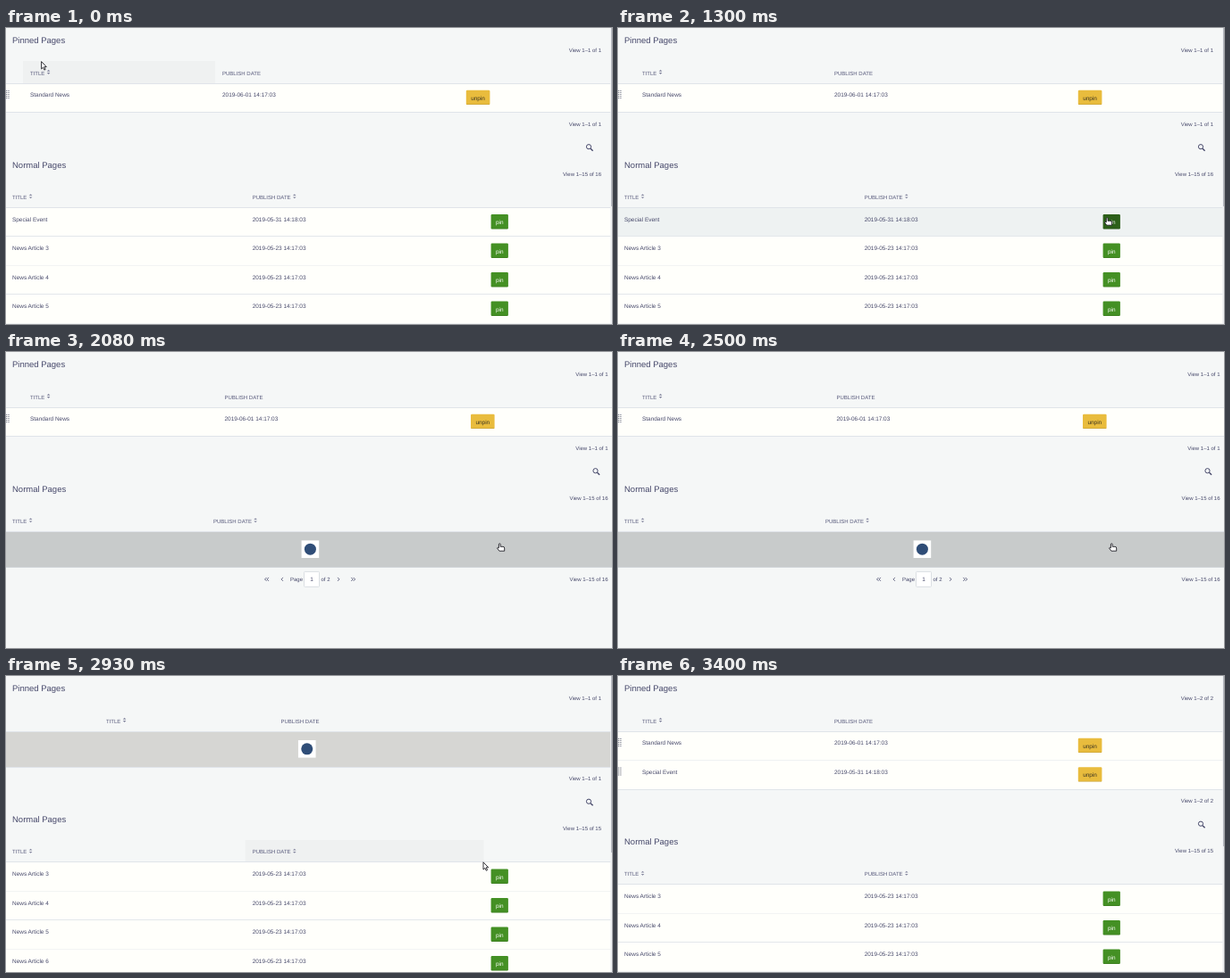
Write an HTML page that moves like this. It is 678x332 px and loops after 3.87 s.

```html
<!DOCTYPE html>
<html lang="en">
<head>
<meta charset="utf-8">
<title>Pinned pages</title>
<style>
  html, body { margin: 0; width: 100%; height: 100%; overflow: hidden; background: #f5f7f7; }
  svg { display: block; width: 678px; height: 332px; }
  text {
    font-family: "Liberation Sans", Arial, sans-serif; font-size: 6.45px;
    fill: #47496b; text-rendering: geometricPrecision;
  }
  .title { font-size: 9.5px; }
  .small { font-size: 6px; }
  .head { fill: #56587a; }
  .end { text-anchor: end; }
  .mid { text-anchor: middle; }
  .light { fill: #fff; }
  .dark { fill: #3a3322; }
  .icon { fill: none; stroke: #47496b; stroke-width: .8; }
</style>
</head>
<body>
<svg viewBox="0 0 678 332"><g id="page"></g><g id="cursor"></g></svg>
<script>
const LOOP = 3870, ROW = 32.5, EMPTY = 40, TOP = 62, HEAD = 25, GAP = 106.9;
const CREAM = '#fffffb', HOVER = '#eef2f2', LINE = '#e0e4e9';
const BTN_Y = 7.7, BTN_H = 16.4, PIN_X = 542.6, PIN_W = 19.3, UNPIN_W = 26.6;
const STANDARD = ['Standard News', '2019-06-01 14:17:03'];
const SPECIAL = ['Special Event', '2019-05-31 14:18:03'];
const ARTICLES = [3, 4, 5, 6].map(n => ['News Article ' + n, '2019-05-23 14:17:03']);

const page = document.getElementById('page');
const pointer = document.getElementById('cursor');

// Cursor runs: start, end, number of steps, way points (first = resting place)
const RUNS = [
  [100, 100, 1, [[39.6, 37.6], [40, 38.3]]],
  [350, 800, 8, [[40, 38.3], [110, 66], [240, 122], [345, 163], [380.3, 175]]],
  [930, 1430, 11, [[380.3, 175], [400, 177], [465, 190], [530, 209], [557, 215], [551.3, 213.8]]],
  [1850, 1850, 1, [[551.3, 213.8], [552.3, 214.8]]],
  [2830, 2930, 4, [[552.3, 214.8], [548, 213], [534, 208.8]]],
  [2955, 3100, 6, [[534, 208.8], [420, 165], [250, 98], [163, 61.5]]],
  [3180, 3330, 3, [[163, 61.5], [135, 47], [64, 8.5]]]
];
const GONE = 3400;

function along(points, p) {
  const s = p * (points.length - 1), i = Math.min(Math.floor(s), points.length - 2), f = s - i;
  return [0, 1].map(k => points[i][k] + (points[i + 1][k] - points[i][k]) * f);
}

function tipAt(t) {
  if (t >= GONE) return [-50, -50];
  let tip = RUNS[0][3][0];
  for (const [from, to, n, points] of RUNS) {
    if (t < from) break;
    const gap = n > 1 ? (to - from) / (n - 1) : 1;
    const step = Math.min(n, Math.floor((t - from) / gap + 1e-6) + 1);
    tip = along(points, step / n);
  }
  return tip;
}

function stateAt(t) {
  const moved = t >= 2510, done = t >= 3060;
  return {
    pinned: done ? [STANDARD, SPECIAL] : t >= 2550 ? [] : [STANDARD],
    normal: moved ? ARTICLES : t >= 2030 ? [] : [SPECIAL, ...ARTICLES],
    total: moved ? 15 : 16,
    pins: done ? 2 : 1,
    veil: moved ? t >= 2630 : t >= 2050,
    thumb: done ? 191 : t >= 2550 ? 198 : 200
  };
}

const rect = (x, y, w, h, fill, more = '') =>
  `<rect x="${x}" y="${y}" width="${w}" height="${h}" fill="${fill}" ${more}/>`;
// y is the middle of the line
const text = (x, y, str, cls = '', drop = 2.3) =>
  `<text x="${x}" y="${y + drop}" class="${cls}">${str}</text>`;
const path = (d, cls) => `<path d="${d}" class="${cls}"/>`;
const rule = (y, w) => rect(0, Math.floor(y), w, 1, LINE);
const sorter = (x, y) =>
  `<path d="M${x - 1.8} ${y - .8}l1.8-1.9 1.8 1.9zM${x - 1.8} ${y + .5}l1.8 1.9 1.8-1.9z" fill="#84869e"/>`;
const inside = ([px, py], x, y, w, h) => px >= x && px < x + w && py >= y && py < y + h;

function header(y, tx, px, end, tip) {
  let out = '';
  for (const [a, b] of [[tx - 8, px - 8], [px - 8, end]])
    if (inside(tip, a, y - HEAD, b - a, HEAD)) out += rect(a, y - HEAD, b - a, HEAD, '#eff1f1');
  return out + text(tx, y - 11.6, 'TITLE', 'small head', 2.1) + sorter(tx + 20.6, y - 12.5) +
    text(px, y - 11.6, 'PUBLISH DATE', 'small head', 2.1);
}

function button(x, y, w, label, over) {
  const pin = label === 'pin';
  const fill = pin ? (over ? '#2c5f19' : '#449024') : (over ? '#d3a526' : '#e9bc3d');
  return rect(x, y + BTN_Y, w, BTN_H, fill, 'rx="1.2"') +
    rect(x + .5, y + BTN_Y + BTN_H - .8, w - 1, .8, '#000', 'opacity=".13"') +
    text(x + w / 2, y + 16.4, label, 'mid ' + (pin ? 'light' : 'dark'));
}

function rows(list, y, tx, px, bx, bw, label, s) {
  let out = '';
  list.forEach(([name, date], i) => {
    const top = y + i * ROW;
    out += rect(0, top, s.width, ROW, inside(s.tip, 0, top, s.width, ROW) ? HOVER : CREAM) +
      rule(top + ROW, s.width) +
      text(tx, top + 12.9, name) + text(px, top + 12.9, date) +
      button(bx, top, bw, label, inside(s.tip, bx, top + BTN_Y, bw, BTN_H));
    if (label === 'unpin')
      out += `<path d="M.7 ${top + 8}v10M3 ${top + 8}v10" stroke="#777b8c" stroke-width="1.3" stroke-dasharray="1.1 .9"/>`;
  });
  return out;
}

function loader(y, s) {
  const over = inside(s.tip, 0, y, s.width, EMPTY), cx = s.width / 2 + (s.wide ? 1.4 : -1.5);
  let out = rect(0, y, s.width, EMPTY, over ? HOVER : CREAM) + rule(y + EMPTY, s.width);
  if (s.veil)
    out += rect(0, y, s.width, EMPTY, '#000', 'opacity=".16"') +
      rect(cx - 9.8, y + 10, 19.6, 19.6, '#fff') +
      `<circle cx="${cx}" cy="${y + 19.8}" r="6.5" fill="#2f4d77"/>`;
  return out;
}

function pager(y) {
  return path(`M291.6 ${y - 2}l-2 2 2 2M294 ${y - 2}l-2 2 2 2M310 ${y - 2}l-2 2 2 2` +
      `M371 ${y - 2}l2 2-2 2M386.2 ${y - 2}l2 2-2 2M388.6 ${y - 2}l2 2-2 2`, 'icon') +
    text(318, y, 'Page', 'small') +
    rect(333.5, y - 8.5, 17, 17, '#fff', 'stroke="#d3d8de" stroke-width=".8" rx="1"') +
    text(342, y, '1', 'mid') + text(352.5, y, 'of 2', 'small');
}

function draw(s) {
  const right = s.wide ? 673.5 : 666;
  const view = (y, a, b) => text(right, y, `View 1–${a} of ${b}`, 'small end', 2.1);
  const idle = !s.pinned.length, blank = !s.normal.length;
  const end = TOP + (idle ? EMPTY : s.pinned.length * ROW), top = end + GAP;
  const tx = idle ? 112 : 27, px = idle ? 307.5 : s.wide ? 244.5 : 242, bx = s.wide ? 520 : 514.8;
  const nx = blank ? 232 : 275.7;
  const gx = right - 14, gy = end + 38.7;

  let out = text(7, 14, 'Pinned Pages', 'title', 3.4) + view(25, s.pins, s.pins) +
    header(TOP, tx, px, idle ? 600 : bx - 8, s.tip) +
    (idle ? loader(TOP, s) : rows(s.pinned, TOP, tx, px, bx, UNPIN_W, 'unpin', s)) +
    rule(TOP, s.width) +
    view(end + 13.1, s.pins, s.pins) +
    `<g fill="none" stroke="#47496b"><circle cx="${gx}" cy="${gy}" r="2.6" stroke-width="1"/>` +
    `<path d="M${gx + 2} ${gy + 2}l2.6 2.6" stroke-width="1.4"/></g>` +
    text(7, end + 58.6, 'Normal Pages', 'title', 3.4) + view(end + 69.1, 15, s.total) +
    header(top, 7, nx, blank ? 470 : 534.5, s.tip) + sorter(nx + 47.1, top - 12.5);
  out += blank
    ? loader(top, s) + pager(top + 53.5) + view(top + 53.5, 15, s.total)
    : rows(s.normal, top, 7, nx, PIN_X, PIN_W, 'pin', s);
  out += rule(top, s.width);
  if (!s.wide)
    out += rect(676.5, 0, 1.5, 332, '#eceef0') + rect(677, 0, 1, s.thumb, '#b4b7be');

  const hand = blank || inside(s.tip, PIN_X, top + BTN_Y, PIN_W, BTN_H) ||
    !idle && inside(s.tip, bx, TOP + BTN_Y, UNPIN_W, BTN_H);
  return [out, hand];
}

const ARROW = 'M0 0v8.3l1.9-1.7 1.4 2.9 1.3-.7-1.4-2.8h2.5z';
const HAND = 'M-.9 .9a.9.9 0 0 1 1.8 0v2.6h2.8q1.7 0 1.7 1.7v3.2h-5.8l-2.4-3.3q.4-1.2 1.9-.1z';
let last = '';

function render(t) {
  const s = stateAt(t);
  s.tip = tipAt(t);
  s.wide = !s.normal.length;
  s.width = s.wide ? 678 : 676.5;
  const [html, hand] = draw(s);
  if (html !== last) page.innerHTML = last = html;
  pointer.innerHTML = `<path d="${hand ? HAND : ARROW}" transform="translate(${s.tip})" ` +
    'fill="#fff" stroke="#1d1d24" stroke-width=".9" stroke-linejoin="round"/>';
}

const start = performance.now();
function tick() {
  render((performance.now() - start) % LOOP);
  requestAnimationFrame(tick);
}
tick();
</script>
</body>
</html>
```
